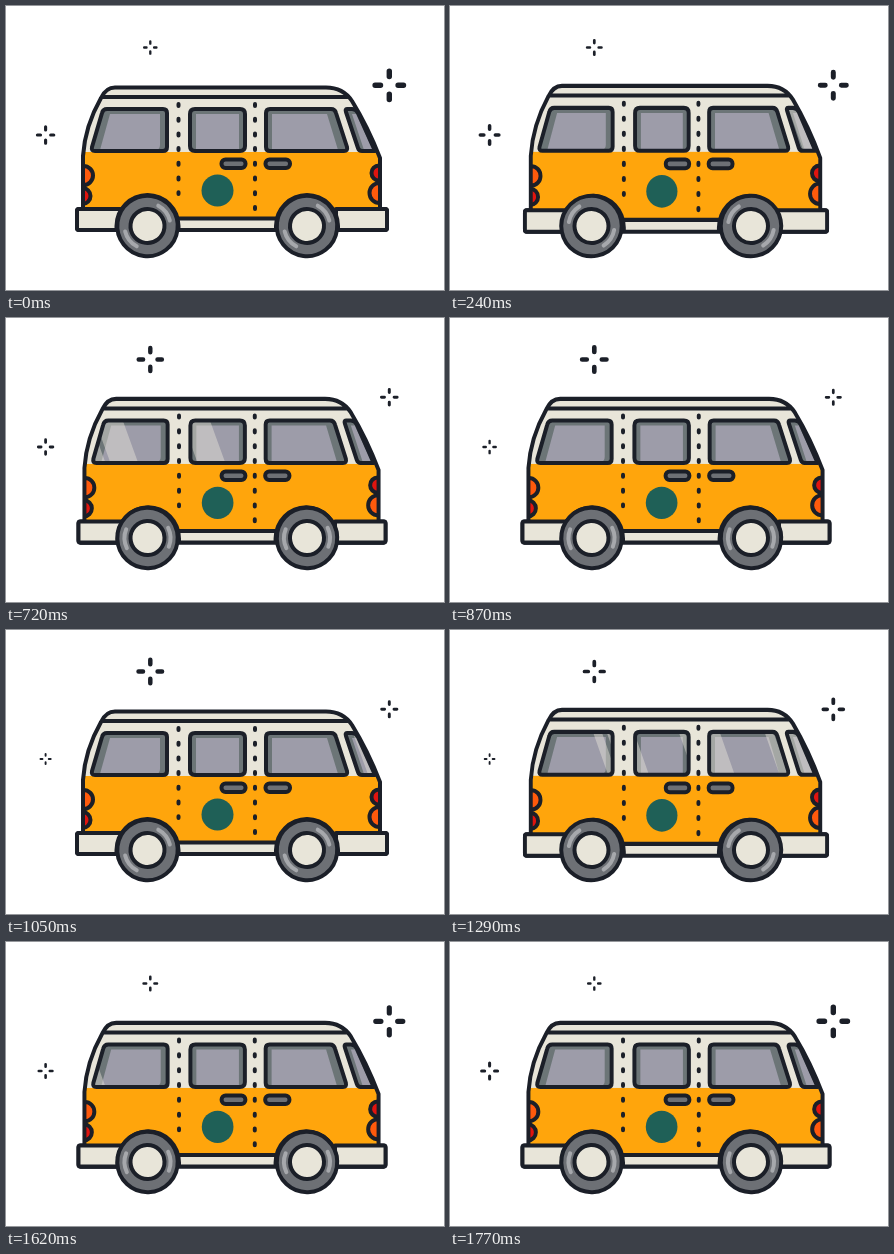
An HTML page for the animation above (1.8 s loop, 438 px wide and 284 px high).

```html
<!DOCTYPE html>
<html lang="en">
<head>
<meta charset="utf-8">
<title>Camper van</title>
<style>
  html, body { margin: 0; width: 100%; height: 100%; overflow: hidden; background: #fff; }
  svg { display: block; width: 100%; height: 100%; }
  .line { stroke: #1b1f28; stroke-width: 4; stroke-linecap: round; stroke-linejoin: round; }
  .none { fill: none; }
  .cream { fill: #e8e5d9; }
  .grey { fill: #6d7075; }
  .shade { fill: #6c7577; }
  .glass { fill: #9d9ca9; }
  .orange { fill: #ff5a0c; }
  .red { fill: #e0140f; }
  .seam { stroke-dasharray: 2 12.7; }
  .glint { stroke: #a6a8ac; stroke-width: 4; stroke-linecap: round; fill: none; }
</style>
</head>
<body>
<svg viewBox="0 0 438 284">
  <defs>
    <path id="shell" d="M77 213V150Q79 120 95 92Q100 81.500 109 81.500H320Q337 81.500 346 95Q362 121 374 152V213Z"/>
    <path id="panes" d="M101 103H157Q161 103 161 107V141Q161 145 157 145H89Q85 145 86 141L96 107Q97 103 101 103Z
      M189 103H234Q239 103 239 108V140Q239 145 234 145H189Q184 145 184 140V108Q184 103 189 103Z
      M264 103H325Q329 103 330 107L341 141Q342 145 338 145H264Q260 145 260 141V107Q260 103 264 103Z
      M341 103H346Q350 103 352 107L369 145H356Q353 145 352 142L340 106Q339 103 341 103Z"/>
    <path id="inner" d="M104 108H154V139Q154 144 149 144H94Z M190 108H233V144H190Z M266 108H321L332 144H266Z M346 108H350L367 144H358Z"/>
    <clipPath id="shellClip"><use href="#shell"/></clipPath>
    <clipPath id="paneClip"><use href="#panes"/></clipPath>
    <g id="wheel">
      <circle class="line grey" r="30.2"/>
      <path class="glint" d="M21 -9.4A23 23 0 0 1 21 9.4M-21 9.4A23 23 0 0 1 -21 -9.4"/>
      <circle class="line cream" r="17"/>
    </g>
    <path id="spark" class="line" style="stroke-width:.32" d="M.52 0H.84M-.52 0H-.84M0 .52V.84M0 -.52V-.84"/>
    <path id="gleam" fill="#e8e5d9" opacity=".45" d="M0 101H9L26 147H17Z M14 101H42L59 147H31Z"/>
  </defs>

  <g id="body">
    <rect class="line cream" x="71" y="203" width="310" height="21" rx="2"/>
    <g clip-path="url(#shellClip)">
      <rect class="cream" x="70" y="78" width="310" height="70"/>
      <rect x="70" y="146" width="310" height="67" fill="#ffa50c"/>
      <circle class="line orange" cx="77.5" cy="169.5" r="9.5"/>
      <circle class="line red" cx="76.5" cy="190" r="8"/>
      <circle class="line red" cx="373" cy="167" r="7.5"/>
      <circle class="line orange" cx="373.5" cy="187" r="10"/>
    </g>
    <path class="line cream" d="M71 205Q71 203 73 203H120V224H73Q71 224 71 222Z M330 203H379Q381 203 381 205V222Q381 224 379 224H330Z"/>
    <path class="line none" d="M77 202V150Q79 120 95 92Q100 81.500 109 81.500H320Q337 81.500 346 95Q362 121 374 152V202M96 91H342M165 212.500H278"/>
    <use href="#panes" class="shade"/>
    <g clip-path="url(#paneClip)">
      <use href="#inner" class="glass"/>
      <g id="shine">
        <use href="#gleam"/>
        <use href="#gleam" x="88"/>
        <use href="#gleam" x="176"/>
      </g>
    </g>
    <use href="#panes" class="line none"/>
    <path class="line none seam" d="M172.500 98V188M249 98V206"/>
    <rect class="line grey" x="215.500" y="153.500" width="24" height="8.500" rx="4"/>
    <rect class="line grey" x="259.500" y="153.500" width="24.500" height="8.500" rx="4"/>
    <circle cx="211.500" cy="184.500" r="16" fill="#1f6057"/>
    <path d="M108.500 225V220A33 33 0 0 1 174.500 220V225Z M268 225V220A33 33 0 0 1 334 220V225Z" fill="#1b1f28"/>
  </g>
  <use href="#wheel" class="wheel" data-x="141.5"/>
  <use href="#wheel" class="wheel" data-x="301"/>
  <g id="sparks"></g>
</svg>
<script>
  const STEP = 30, STEPS = 60, TURN = Math.PI * 2;
  const el = id => document.getElementById(id);
  const place = (node, value) => node.setAttribute('transform', value);

  // Each star: centre, mean size, swing, step at which it is largest
  const stars = [
    { x: 144.3, y: 41.5, mean: 10.9, swing: 3.6, peak: 30 },
    { x: 383.3, y: 79.3, mean: 12.7, swing: 4.2, peak: 0 },
    { x: 39.6, y: 129, mean: 8.4, swing: 2.7, peak: 10 }
  ];
  for (const star of stars) {
    star.node = document.createElementNS('http://www.w3.org/2000/svg', 'use');
    star.node.setAttribute('href', '#spark');
    el('sparks').append(star.node);
  }
  const wheels = [...document.querySelectorAll('.wheel')];

  // [step, x] of the leading gleam, for two sweeps
  const sweep = [[0, 460], [7, 350], [16, 138], [24, -15], [30, -240],
    [30.1, 460], [35, 346], [43, 140], [54, -136], [59, -260], [60, -260]];

  function along(keys, t) {
    const i = Math.max(1, keys.findIndex(k => k[0] >= t));
    const [t0, v0] = keys[i - 1], [t1, v1] = keys[i];
    return v0 + (v1 - v0) * (t - t0) / (t1 - t0);
  }

  function draw(step) {
    const squash = (1 - Math.cos(TURN * step / 5)) / 2;
    const sx = 1 - 0.028 * squash, sy = 1 + 0.026 * squash;
    place(el('body'), `translate(226 152.5) scale(${sx} ${sy}) translate(-226 -152.5)`);
    place(el('shine'), `translate(${along(sweep, step)} 0)`);
    for (const wheel of wheels)
      place(wheel, `translate(${wheel.dataset.x} 220) rotate(${144 * step - 38})`);
    for (const s of stars) {
      const size = s.mean + s.swing * Math.cos(TURN * (step - s.peak) / STEPS);
      place(s.node, `translate(${s.x} ${s.y}) scale(${size})`);
    }
  }

  const start = performance.now();
  function tick() {
    draw(Math.floor((performance.now() - start) / STEP) % STEPS);
    requestAnimationFrame(tick);
  }
  tick();
</script>
</body>
</html>
```
